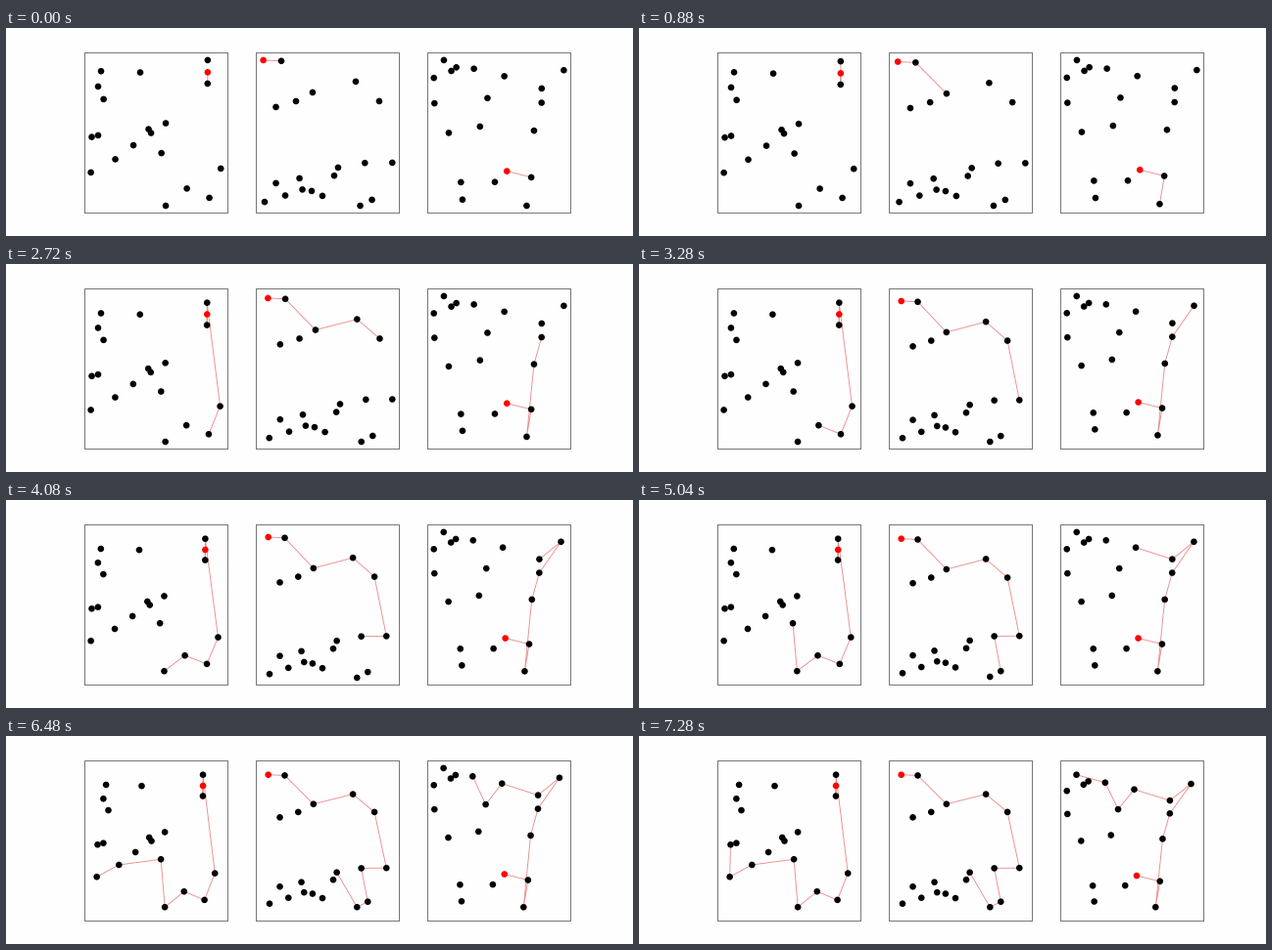
A matplotlib script for the animation above (8 s loop, 640 by 213 pixels).

```python
import numpy as np
import matplotlib.pyplot as plt
from matplotlib.animation import FuncAnimation

WIDTH, HEIGHT, DPI = 640, 213, 100
INTERVAL, FRAMES, STEP_FRAMES = 80, 100, 10
PX = 72 / DPI
MARGIN = 0.05
BACKGROUND = "#fefefe"

# Each tour starts at the first city and follows the listed order.
TOURS = [
    [(205.8, 45.4), (205.7, 57), (205.8, 33), (219.2, 144), (207.5, 174),
     (184.6, 164.5), (163, 182.1), (158.6, 128.2), (111.5, 134.5),
     (86.6, 148), (87.5, 111.7), (94, 110), (97, 44.3), (137, 45.6),
     (94, 60), (99.6, 73), (163, 97.6), (145.5, 103.7), (148, 107.6),
     (130, 120.2)],
    [(261.7, 33), (280.2, 33.8), (312.4, 66), (356.7, 54.9), (380.9, 75),
     (394.3, 138), (366.1, 138.3), (373.4, 176), (361.3, 182.1),
     (338.6, 143), (334.6, 151.3), (295.3, 75), (274.7, 81), (298.9, 154),
     (274.7, 159), (284.3, 171.6), (301.9, 165.5), (311.4, 167),
     (322.5, 172), (263.1, 178.2)],
    [(511.3, 146.7), (536.2, 153), (531.5, 182.1), (539, 105.2),
     (546.7, 76.6), (569.4, 43.3), (546.8, 62), (508.7, 49.5),
     (491.5, 71.9), (477.7, 41.8), (447, 33), (459.7, 40.4), (454.6, 44.1),
     (436.8, 51.2), (437.4, 77.2), (483.9, 101), (452, 107.5),
     (499, 157.8), (464.4, 158), (466, 175.8)],
]


def padded_bounds(points):
    low, high = points.min(axis=0), points.max(axis=0)
    pad = MARGIN * (high - low)
    return np.array([low - pad, high + pad])


class Panel:
    def __init__(self, ax, tour):
        self.ax, self.tour = ax, np.array(tour)
        ax.set(xticks=[], yticks=[], facecolor=BACKGROUND)
        ax.spines[:].set(linewidth=PX, color="#777777")
        self.path, = ax.plot([], [], color="#ee8c8c", lw=0.9 * PX, zorder=1)
        colors = ["red"] + ["black"] * (len(tour) - 1)
        ax.scatter(*self.tour.T, s=(6.6 * PX) ** 2, c=colors, lw=0, zorder=2)

    def show(self, step):
        visited = self.tour[:step + 1]
        self.path.set_data(*visited.T)
        # The padded path widens the view as it reaches the outer cities.
        content = np.vstack([self.tour, padded_bounds(visited)])
        (left, top), (right, bottom) = padded_bounds(content)
        self.ax.set(xlim=(left, right), ylim=(bottom, top))


fig, axes = plt.subplots(1, 3, figsize=(WIDTH / DPI, HEIGHT / DPI), dpi=DPI,
                         facecolor=BACKGROUND)
fig.subplots_adjust(left=0.125, right=0.9, bottom=0.1105, top=0.8805,
                    wspace=0.2)
panels = [Panel(ax, tour) for ax, tour in zip(axes, TOURS)]


def draw(frame):
    step = max(1, (frame - 1) // STEP_FRAMES + 1)
    for panel in panels:
        panel.show(step)


anim = FuncAnimation(fig, draw, frames=FRAMES, interval=INTERVAL, repeat=True,
                     init_func=lambda: draw(0))
plt.show()
```
